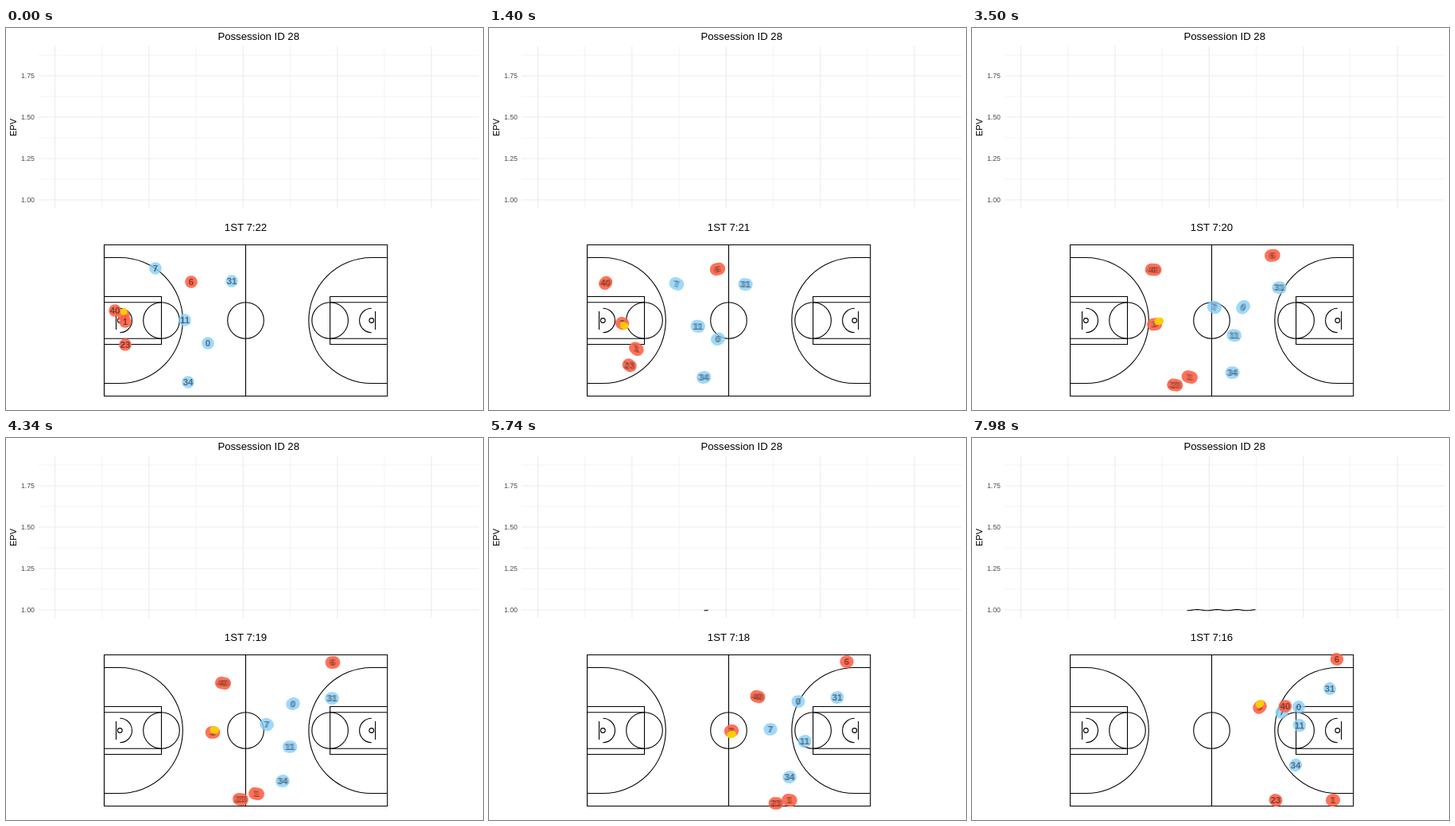
Animation of 600 by 480 pixels, one loop 8 s. Source, as an HTML page:

```html
<!DOCTYPE html>
<html lang="en">
<head>
<meta charset="utf-8">
<title>Possession</title>
<style>
  html, body { margin: 0; width: 100%; height: 100%; overflow: hidden; background: #fff; }
  svg { display: block; width: 600px; height: 480px; font-family: "Liberation Sans", Arial, sans-serif; text-anchor: middle; }
  .title { font-size: 13.2px; }
  .axis { font-size: 8.8px; fill: #4d4d4d; text-anchor: end; }
  .court { fill: none; stroke: #000; stroke-width: 1.1; }
  .num { font-size: 11.4px; font-weight: bold; fill-opacity: .2; }
  .dot { stroke-linecap: round; }
</style>
</head>
<body>
<svg viewBox="0 0 600 480">
  <g id="grid" stroke="#ebebeb"></g>
  <g id="ticks" class="axis"></g>
  <text class="title" x="317.7" y="15">Possession ID 28</text>
  <text font-size="11" transform="translate(13.3 125) rotate(-90)">EPV</text>
  <polyline id="epv" fill="none" stroke="#000" stroke-width="1.1"/>
  <text id="clock" class="title" x="301.5" y="255"></text>
  <g class="court">
    <path d="M123.5 272.5H479.7V462.5H123.5ZM301.5 272.5V462.5"/>
    <circle cx="301.5" cy="367.5" r="22.8"/>
    <g id="half">
      <path d="M123.5 337.5H195.5V397.5H123.5M123.5 344.7H195.5M123.5 390.3H195.5M138.5 356V379"/>
      <path d="M123.5 288.5H143.3A79 79 0 0 1 143.3 446.5H123.5"/>
      <path d="M143.3 352.3A15.2 15.2 0 0 1 143.3 382.7"/>
      <circle cx="195.5" cy="367.5" r="22.8"/>
      <circle cx="143.3" cy="367.5" r="2.9"/>
    </g>
    <use href="#half" transform="translate(603.1 0) scale(-1 1)"/>
  </g>
  <g id="players"></g>
</svg>
<script>
const LOOP = 8000, STEP = 140;
const $ = id => document.getElementById(id);

function add(parent, tag, attrs, text = "") {
  const el = document.createElementNS("http://www.w3.org/2000/svg", tag);
  set(el, attrs);
  el.textContent = text;
  parent.append(el);
  return el;
}
function set(el, attrs) {
  for (const k in attrs) el.setAttribute(k, attrs[k]);
}

// Chart grid: every second line is a major one
for (let i = 0; i < 9; i++) {
  const x = 61.5 + i * 59.2;
  add($("grid"), "path", { d: `M${x} 23V226`, "stroke-width": i % 2 ? .6 : 1.1 });
}
for (let i = 0; i < 8; i++) {
  const y = 34 + i * 26;
  add($("grid"), "path", { d: `M41 ${y}H595`, "stroke-width": i % 2 ? 1.1 : .6 });
  if (i % 2) add($("ticks"), "text", { x: 36, y: y + 3.2 }, (2 - (i + 1) / 8).toFixed(2));
}

// Steps at which a runner passes its key points; trails are centred a third of a step back
const KEYS = [0, 16, 31, 41, 57].map(k => k && k - 1 / 3);

// Smooth curve through unevenly spaced values
function spline(v) {
  const last = v.length - 1;
  const h = i => KEYS[i + 1] - KEYS[i];
  const d = i => (v[i + 1] - v[i]) / h(i);
  const slope = v.map((_, i) => {
    const j = Math.min(Math.max(i, 1), last - 1);
    const bend = (d(j) - d(j - 1)) / (h(j) + h(j - 1));
    return d(j - 1) + bend * (h(j - 1) + 2 * (KEYS[i] - KEYS[j]));
  });
  return s => {
    let i = 0;
    while (i < last - 1 && s > KEYS[i + 1]) i++;
    const w = h(i), u = (s - KEYS[i]) / w, r = 1 - u;
    return r * r * ((1 + 2 * u) * v[i] + u * w * slope[i])
         + u * u * ((3 - 2 * u) * v[i + 1] - r * w * slope[i + 1]);
  };
}

const movers = [];
function mover(label, x, y, color, alpha = 1, size = 8.8) {
  const g = add($("players"), "g", {});
  const dot = add(g, "line", { class: "dot", stroke: color, "stroke-opacity": alpha, "stroke-width": size });
  const nums = label ? [0, 1, 2].map(() => add(g, "text", { class: "num" }, label)) : [];
  movers.push({ x, y, dot, nums });
}
function runner(label, path, color, alpha) {
  const pts = path.split(" ").map(p => p.split(","));
  const [x, y] = [0, 1].map(axis => spline(pts.map(p => +p[axis])));
  mover(label, x, y, color, alpha, 15.6);
  return { x, y };
}
const blue = (label, path) => runner(label, path, "#87cefa", .8);
const red = (label, path) => runner(label, path, "#ff6347", .9);

blue("7", "188,302 264,333 328,360 354,366 390,344");
blue("31", "284,318 347,324 410,327 438,326 450,315");
blue("11", "225,367 288,379 357,388 397,381 412,361");
blue("0", "254,396 309,381 361,334 389,331 411,338");
blue("34", "229,445 294,436 348,431 378,426 407,411");
const carrier = red("3", "148,361 187,374 260,370 305,368 362,338");
red("6", "233,319 322,295 411,282 450,281 459,278");
red("40", "137,355 168,308 273,308 338,325 394,337");
red("1", "150,369 215,420 315,447 378,455 454,455");
red("23", "150,398 202,436 295,454 361,459 382,455");

// The ball is dribbled around its carrier, pushed ahead during the sprint
mover("",
  s => carrier.x(s) + 7 * Math.exp(-(((s - 20) / 10) ** 2)),
  s => carrier.y(s) - 4.5 * Math.cos(2 * Math.PI * s / 27),
  "#ffcc00");

// Value line: a small ripple around 1.00 that starts late and grows to the right
function epvPoints(step) {
  const length = step > 40 ? 87 - 5.1 * (57 - step) : 0;
  const pts = [];
  for (let x = 0; x < length; x++) pts.push([270.5 + x, 216.2 + .6 * Math.cos(x / 4)]);
  return pts.join(" ");
}

function draw(now) {
  const step = Math.floor(now % LOOP / STEP);
  const seconds = Math.max(0, Math.floor((step * STEP - 1330) / 1167) + 1);
  $("clock").textContent = "1ST 7:" + (22 - seconds);
  set($("epv"), { points: epvPoints(step) });

  for (const { x, y, dot, nums } of movers) {
    const tail = Math.max(0, step - 2 / 3);
    set(dot, { x1: x(tail), y1: y(tail), x2: x(step), y2: y(step) });
    nums.forEach((num, i) => {
      const s = Math.max(0, step - i / 3);
      set(num, { x: x(s), y: y(s) + 4.1 });
    });
  }
}

const start = performance.now();
function loop() {
  draw(performance.now() - start);
  requestAnimationFrame(loop);
}
loop();
</script>
</body>
</html>
```
